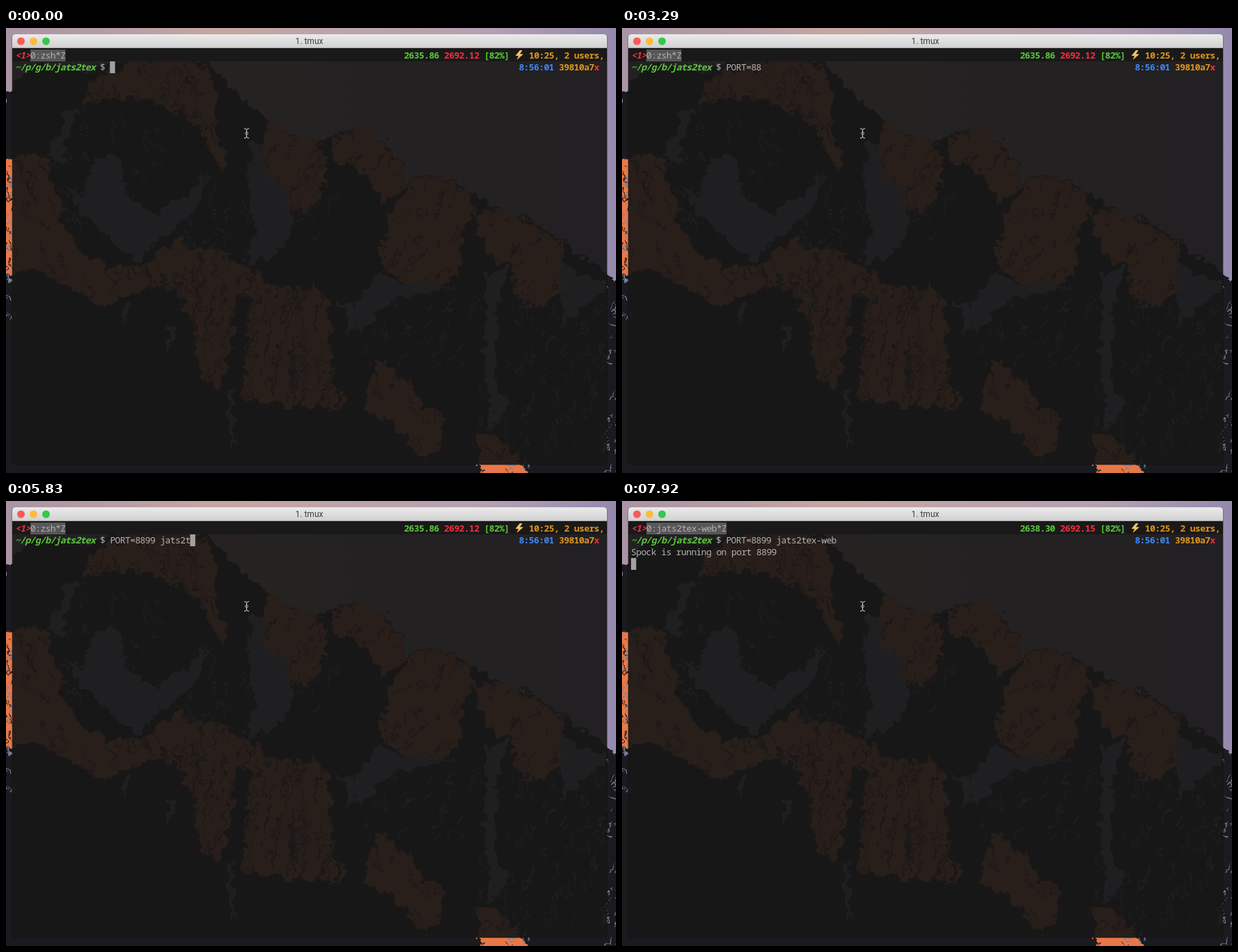
An HTML page for the animation above (8 s loop, 876 px wide and 640 px high).

```html
<!DOCTYPE html>
<html lang="en">
<head>
<meta charset="utf-8">
<title>tmux</title>
<style>
html, body { margin: 0; width: 100%; height: 100%; overflow: hidden; background: #18181b; }
svg { display: block; }
.term text { font: 500 13px "Noto Sans Mono", "DejaVu Sans Mono", monospace; letter-spacing: -.6px; white-space: pre; fill: #b4b2b2; }
.term .bold { font-weight: 600; }
.term .italic { font-style: italic; }
.term .green { fill: #58c83a; }
.term .red { fill: #f03040; }
.term .amber { fill: #dc951f; }
.term .blue { fill: #3f87f2; }
</style>
</head>
<body>
<svg width="876" height="640" viewBox="0 0 876 640">
  <defs>
    <linearGradient id="sky">
      <stop offset="0" stop-color="#a994a6"/>
      <stop offset=".35" stop-color="#c5a6a2"/>
      <stop offset=".8" stop-color="#b3a0b2"/>
      <stop offset="1" stop-color="#9489ad"/>
    </linearGradient>
    <linearGradient id="bar" x2="0" y2="1">
      <stop offset="0" stop-color="#ebebeb"/>
      <stop offset="1" stop-color="#d0d0d0"/>
    </linearGradient>
    <filter id="rough" filterUnits="userSpaceOnUse" x="-20" y="0" width="920" height="670" color-interpolation-filters="sRGB">
      <feTurbulence type="fractalNoise" baseFrequency=".07" numOctaves="4" seed="4"/>
      <feDisplacementMap in="SourceGraphic" scale="24" xChannelSelector="R" yChannelSelector="G"/>
    </filter>
    <path id="ridge" d="M-20 130L15 72 45 52 110 62 180 42 255 34 290 52 318 80 345 110 378 133 410 152 448 166 465 157 500 146 525 148 547 168 565 192 577 223 590 214 620 211 645 222 690 250 720 270 745 272 775 290 835 334 900 378V670H-20Z"/>
    <clipPath id="inside"><use href="#ridge"/></clipPath>
  </defs>

  <rect width="876" height="640" fill="url(#sky)"/>
  <g filter="url(#rough)">
    <use href="#ridge" fill="#1a1a1f"/>
    <g clip-path="url(#inside)">
      <path fill="#e87848" d="M112 108L120 78 180 48 255 36 290 62 302 95 302 150 318 195 308 212 288 160 265 130 225 112 190 102 150 102Z
        M-20 195L45 180 60 190 66 222 85 260 80 282 95 300 115 330 150 345 200 338 250 300 260 320 300 318 345 340 375 365 420 375 445 370 465 400 470 520 490 532 480 545 420 545 340 535 345 450 350 385 330 390 325 460 305 520 275 500 270 430 255 400 240 370 200 375 140 402 100 375 50 350 -20 352Z
        M365 170L380 133 410 155 440 160 460 180 455 235 430 270 405 260 385 220 365 215Z
        M465 160L500 148 525 148 560 185 577 225 545 250 530 235 510 200 470 195Z
        M545 280L580 220 620 212 665 235 672 265 655 290 650 350 615 375 570 365 540 340Z
        M672 265L700 262 745 275 800 310 803 370 770 402 735 395 725 345 690 320Z
        M518 520L535 475 580 510 600 545 625 555 625 600 600 625 560 570 515 550Z
        M678 582L705 585 765 660H678Z"/>
      <path id="cracks" fill="none" stroke="#1a1a1f" stroke-width="1.5"/>
      <path fill="#76809c" d="M88 120L102 112 92 150 78 200 60 180Z
        M85 225L112 240 125 190 165 182 172 240 210 268 262 240 292 205 270 270 230 298 185 334 140 295 105 262Z
        M350 170L368 160 372 205 398 225 412 275 398 318 350 342 358 280 345 235Z
        M474 392L500 402 536 345 556 366 650 372 570 388 535 408 505 440Z
        M688 355L718 345 700 420 705 520 722 540 698 575 688 480Z
        M795 320L810 345 865 372 830 400 800 430Z
        M320 520L328 535 326 605 318 580Z M235 420L246 440 232 465Z M165 400L182 395 168 430Z"/>
      <path id="snow" fill="none" stroke="#76809c" stroke-width="1.6"/>
    </g>
  </g>

  <rect x="8" y="9" width="856" height="620" rx="5" fill="#000" opacity=".22"/>
  <path d="M9 29H863V624Q863 628 859 628H13Q9 628 9 624Z" fill="#191818" opacity=".9"/>
  <path d="M9 29V14Q9 9 14 9H858Q863 9 863 14V29Z" fill="url(#bar)"/>
  <path d="M9 28.5H863" stroke="#aaa"/>
  <circle cx="21.5" cy="19" r="5.5" fill="#fc5b57"/>
  <circle cx="39.5" cy="19" r="5.5" fill="#fdbc40"/>
  <circle cx="57.5" cy="19" r="5.5" fill="#34c84a"/>
  <text x="435.5" y="23.3" text-anchor="middle" fill="#3e3e3e" font-family="Roboto, sans-serif" font-size="12">1. tmux</text>

  <g class="term">
    <rect x="9" y="29" width="854" height="19" fill="#1a1919"/>
    <text x="13" y="44" class="red bold italic">&lt;1&gt;</text>
    <rect id="tabBack" x="35" y="31" height="17" fill="#575658"/>
    <text id="tab" x="35" y="44"/>
    <text id="load" x="571.4" y="44" class="green bold"/>
    <text id="peak" x="629" y="44" class="red bold"/>
    <text x="686.6" y="44" class="green bold">[82%]</text>
    <path d="M738 32L731.5 40H736L733.5 46 743 37.5H738L741.5 32Z" fill="#f6c667"/>
    <text x="751" y="44" class="amber bold">10:25, 2 users,</text>
    <text x="736.4" y="61" class="blue bold">8:56:01</text>
    <text x="794" y="61" class="amber bold">39810a7</text>
    <text x="844.4" y="61" class="red bold">x</text>
    <text x="13" y="61" class="green bold italic">~/p/g/b/jats2tex</text>
    <text x="135" y="61">$</text>
    <text id="typed" x="149.4" y="61"/>
    <text id="reply" x="13" y="78"/>
    <rect id="cursor" width="7.4" height="17" fill="#a3a1a1"/>
  </g>

  <g fill="none" stroke="#d8d8d8">
    <path d="M342 144.5Q345.5 144.5 345.5 147V156Q345.5 158.5 342 158.5M349 144.5Q345.5 144.5 345.5 147M345.5 156Q345.5 158.5 349 158.5"/>
    <circle cx="345.5" cy="151.5" r="2" stroke="#999"/>
  </g>
</svg>
<script>
const $ = id => document.getElementById(id);
const CELL = 7.2, LOOP = 8000;
const COMMAND = "PORT=8899 jats2tex-web";

// [start ms, letters typed, cursor hidden]
const KEYS = [
  [0, 0], [300, 1], [450, 2], [600, 4], [1040, 5], [1940, 6], [2540, 7],
  [3290, 7, true], [3440, 8], [3590, 9], [4340, 9, true],
  [4640, 10], [4790, 11], [4940, 12], [5090, 13], [5230, 14],
  [5680, 15], [5830, 16], [5980, 17], [6130, 18], [6580, 19],
  [6880, 21], [7030, 22]
];
const ENTER = 7470, REPLY = 7620, REFRESH = 7920;

let seed = 7;
const random = () => (seed = seed * 16807 % 2147483647) / 2147483647;

// Parallel scratches scattered over a box
function scratches(count, x, y, w, h, dx, dy) {
  let d = "";
  for (let i = 0; i < count; i++) {
    const k = .3 + random();
    d += `M${x + random() * w} ${y + random() * h}l${dx * k} ${dy * k}`;
  }
  return d;
}

$("cracks").setAttribute("d",
  scratches(90, 100, 40, 220, 100, 10, 22) +
  scratches(110, -10, 180, 260, 220, 8, 24) +
  scratches(170, 260, 310, 230, 220, -7, 36) +
  scratches(240, 360, 140, 450, 250, -12, 20) +
  scratches(60, 510, 480, 260, 160, 10, 20));
$("snow").setAttribute("d",
  scratches(45, 60, 110, 220, 190, 14, 20) +
  scratches(45, 260, 210, 220, 120, -16, 26) +
  scratches(35, 490, 370, 180, 110, -14, 16) +
  scratches(75, 670, 380, 200, 240, -8, 24) +
  scratches(40, 858, 390, 30, 250, -6, 9) +
  scratches(30, -8, 200, 20, 220, 5, 10));

function draw() {
  const t = performance.now() % LOOP;
  const [, count, hidden] = KEYS.findLast(key => key[0] <= t);
  const running = t >= REPLY, entered = t >= ENTER;
  const tab = running ? "0:jats2tex-web*Z" : "0:zsh*Z";

  $("tab").textContent = tab;
  $("tabBack").setAttribute("width", tab.length * CELL);
  $("load").textContent = t < REFRESH ? "2635.86" : "2638.30";
  $("peak").textContent = t < REFRESH ? "2692.12" : "2692.15";
  $("typed").textContent = COMMAND.slice(0, count);
  $("reply").textContent = running ? "Spock is running on port 8899" : "";

  const cursor = $("cursor");
  cursor.setAttribute("x", entered ? 13 : 149.2 + count * CELL);
  cursor.setAttribute("y", running ? 82 : entered ? 65 : 48);
  cursor.setAttribute("visibility", hidden ? "hidden" : "visible");
  requestAnimationFrame(draw);
}
draw();
</script>
</body>
</html>
```
